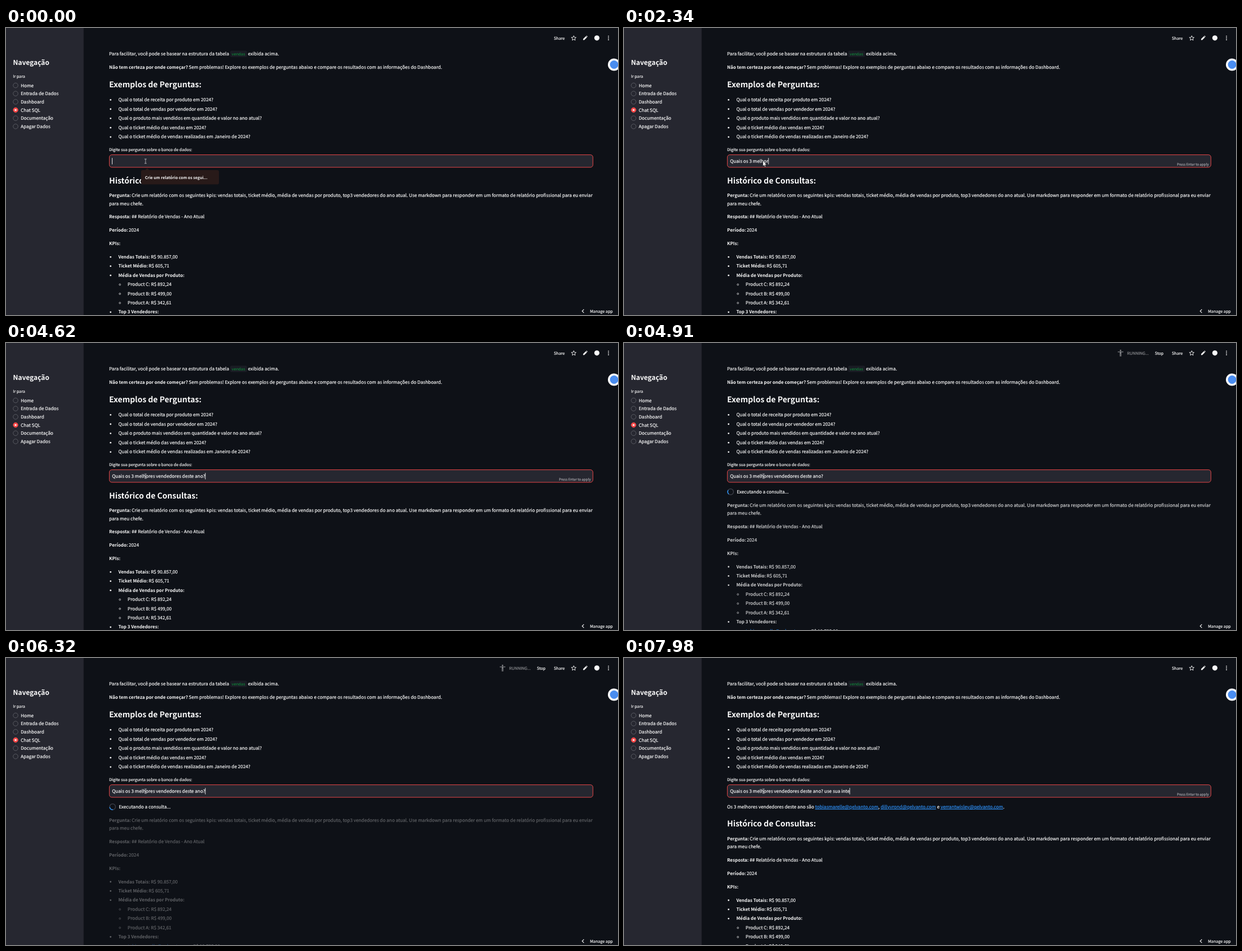
These frames come from a looping animation (1092 by 513 pixels, 8000 ms). An HTML page:

```html
<!DOCTYPE html>
<html lang="pt-BR">
<head>
<meta charset="utf-8">
<title>Chat SQL</title>
<style>
html, body { margin: 0; width: 100%; height: 100%; overflow: hidden; background: #0e1117; }
svg { display: block; width: 100%; height: 100%; }
text {
  font-family: "Noto Sans CJK JP", "Noto Sans CJK SC", "Noto Sans CJK", "Open Sans", sans-serif;
  white-space: pre;
  text-rendering: geometricPrecision;
  stroke-width: 0.18px;
}
.link { fill: #2e8ff5; stroke: #2e8ff5; text-decoration: underline; }
</style>
</head>
<body>
<svg id="stage" viewBox="0 0 1092 513"></svg>
<script>
const LOOP = 8000;
const WHITE = '#fafafa', RED = '#ff4b4b', PANEL = '#262730', BG = '#0e1117';
const BODY = 8.217, SMALL = 7.19, BOLD_SCALE = 0.977;
const RUN = 4710, ANSWER = 6430, IDLE = 6530;
const stage = document.getElementById('stage');

function el(parent, tag, attrs = {}, content) {
  const node = document.createElementNS('http://www.w3.org/2000/svg', tag);
  for (const key in attrs) node.setAttribute(key, attrs[key]);
  if (content !== undefined) node.textContent = content;
  parent.appendChild(node);
  return node;
}
const group = (parent = stage) => el(parent, 'g');
const show = (node, on) => node.setAttribute('visibility', on ? 'visible' : 'hidden');

// A hairline outline gives regular text its slightly heavy screen look.
function text(parent, x, y, str, size = BODY, attrs = {}) {
  const fill = attrs.fill || WHITE;
  return el(parent, 'text', { x, y, 'font-size': size, fill, stroke: fill, ...attrs }, str);
}
function bold(parent, x, y, str, size = BODY * BOLD_SCALE) {
  return text(parent, x, y, str, size, { 'font-weight': 700, stroke: 'none' });
}
function pair(parent, x, y, label, x2, rest) {
  bold(parent, x, y, label);
  text(parent, x2, y, rest);
}
// Text flowing on one line; parts holding an @ become links.
function linked(parent, x, y, parts) {
  const line = text(parent, x, y, '');
  for (const part of parts) {
    el(line, 'tspan', part.includes('@') ? { class: 'link' } : {}, part);
  }
}
const dot = (parent, y) => el(parent, 'circle', { cx: 186.6, cy: y, r: 1.4, fill: WHITE });
const ring = (parent, y) =>
  el(parent, 'circle', { cx: 203.2, cy: y, r: 1.4, fill: 'none', stroke: WHITE, 'stroke-width': 0.7 });
const stroke = (parent, d, color, width, attrs = {}) =>
  el(parent, 'path', { d, fill: 'none', stroke: color, 'stroke-width': width, ...attrs });

const mails = ['tobiasmarelle', 'dillyvrond', 'verrantwisley'].map(name => name + '@qelvanto.com');

el(stage, 'rect', { width: 1092, height: 513, fill: BG });

// Sidebar
el(stage, 'rect', { width: 138.5, height: 513, fill: PANEL });
bold(stage, 12.5, 65.8, 'Navegação', 12.05);
text(stage, 12.5, 88.8, 'Ir para', SMALL);
['Home', 'Entrada de Dados', 'Dashboard', 'Chat SQL', 'Documentação', 'Apagar Dados'].forEach((name, i) => {
  const y = 102.6 + i * 14.66, on = i === 3;
  el(stage, 'circle', {
    cx: 17.1, cy: y, r: 4.3, fill: on ? RED : PANEL,
    stroke: on ? RED : '#7b7c83', 'stroke-width': 0.6
  });
  if (on) el(stage, 'circle', { cx: 17.1, cy: y, r: 1.7, fill: WHITE });
  text(stage, 26.2, y + 3.1, name);
});

// Toolbar
text(stage, 977.5, 20.8, 'Share', SMALL);
let star = '';
for (let i = 0; i < 10; i++) {
  const a = i * Math.PI / 5, r = i % 2 ? 2 : 4.5;
  star += (i ? 'L' : 'M') + (1013 + r * Math.sin(a)) + ' ' + (18.3 - r * Math.cos(a));
}
stroke(stage, star + 'Z', WHITE, 0.9, { 'stroke-linejoin': 'round' });
el(stage, 'path', {
  d: 'M1029.8 21.6V19.6L1034.6 14.8L1036.6 16.8L1031.8 21.6ZM1035.2 14.2L1036 13.6L1037.8 15.4L1037.2 16.2Z',
  fill: WHITE
});
el(stage, 'circle', { cx: 1054.3, cy: 17.8, r: 4.6, fill: WHITE });
for (const y of [14.6, 17.8, 21]) el(stage, 'circle', { cx: 1075, cy: y, r: 0.95, fill: WHITE });

// Floating badge
el(stage, 'circle', { cx: 1085, cy: 65.5, r: 11, fill: '#fff' });
el(stage, 'circle', { cx: 1085, cy: 65.5, r: 7.4, fill: '#4a8df0' });

// Introduction
text(stage, 184, 49.1, 'Para facilitar, você pode se basear na estrutura da tabela');
el(stage, 'rect', { x: 400, y: 40.5, width: 30, height: 11.5, rx: 2.3, fill: '#1a1c24' });
text(stage, 402.4, 48.7, 'vendas', 6.9, {
  fill: '#0c9a3c', stroke: 'none', style: 'font-family:"Noto Sans Mono","DejaVu Sans Mono",monospace'
});
text(stage, 431.8, 49.1, 'exibida acima.');
pair(stage, 184, 72.7, 'Não tem certeza por onde começar?', 326,
  'Sem problemas! Explore os exemplos de perguntas abaixo e compare os resultados com as informações do Dashboard.');
bold(stage, 184, 105.8, 'Exemplos de Perguntas:', 14.05);
[
  'Qual o total de receita por produto em 2024?',
  'Qual o total de vendas por vendedor em 2024?',
  'Qual o produto mais vendidos em quantidade e valor no ano atual?',
  'Qual o ticket médio das vendas em 2024?',
  'Qual o ticket médio de vendas realizadas em Janeiro de 2024?'
].forEach((line, i) => {
  const y = 128 + i * 16.6;
  dot(stage, y + 0.4);
  text(stage, 200.4, y + 3, line);
});

// Question field
text(stage, 184, 220, 'Digite sua pergunta sobre o banco de dados:', SMALL);
el(stage, 'rect', {
  x: 184.4, y: 226.6, width: 862.8, height: 22.4, rx: 4.4,
  fill: PANEL, stroke: RED, 'stroke-width': 0.9
});
const typed = text(stage, 189.2, 241.3, '');
const caret = el(stage, 'rect', { y: 232.3, width: 0.9, height: 11.4, fill: WHITE });
const hint = text(stage, 986.4, 246.2, 'Press Enter to apply', 6.16, { fill: '#a8a8ad' });

// History of queries
const history = group(), heading = group(history), log = group(history);
bold(heading, 184, 277.8, 'Histórico de Consultas:', 14.05);
pair(log, 184, 302, 'Pergunta:', 224.3,
  'Crie um relatório com os seguintes kpis: vendas totais, ticket médio, média de vendas por produto, ' +
  'top3 vendedores do ano atual. Use markdown para responder em um formato de relatório profissional para eu enviar');
text(log, 184, 316.5, 'para meu chefe.');
pair(log, 184, 340.4, 'Resposta:', 224.2, '## Relatório de Vendas - Ano Atual');
pair(log, 184, 364.1, 'Período:', 219, '2024');
bold(log, 184, 387.9, 'KPIs:');
const rowY = i => 408.9 + i * 16.42;
[['Vendas Totais:', 258.4, 'R$ 90.857,00'], ['Ticket Médio:', 254.6, 'R$ 605,71'], ['Média de Vendas por Produto:']]
  .forEach(([label, x, value], i) => {
    dot(log, rowY(i) + 0.4);
    pair(log, 200.4, rowY(i) + 3, label, x || 0, value || '');
  });
['C: R$ 892,24', 'B: R$ 499,00', 'A: R$ 342,61'].forEach((value, i) => {
  ring(log, rowY(i + 3) + 0.5);
  text(log, 217, rowY(i + 3) + 3, 'Product ' + value);
});
dot(log, rowY(6) + 0.4);
bold(log, 200.4, rowY(6) + 3, 'Top 3 Vendedores:');
ring(log, rowY(7) + 0.5);
linked(log, 217, rowY(7) + 3, [mails[0], ': R$ 10.795,00']);

const answer = group();
linked(answer, 184, 268.9, ['Os 3 melhores vendedores deste ano são ', mails[0], ', ', mails[1], ' e ', mails[2], '.']);

// Busy state
const busy = group();
const GREY = '#85868a';
el(busy, 'circle', { cx: 886, cy: 13.4, r: 1.3, fill: GREY });
stroke(busy, 'M881 15.9H891', GREY, 1.2);
stroke(busy, 'M886 15.6V19.4', GREY, 2.6);
stroke(busy, 'M885.2 19V24M886.8 19V24', GREY, 1.1);
text(busy, 897.8, 20.8, 'RUNNING...', SMALL, { fill: '#8f9094' });
text(busy, 947.3, 20.8, 'Stop', SMALL);

const spinner = group();
text(spinner, 201.2, 268.9, 'Executando a consulta...');
el(spinner, 'circle', { cx: 190.2, cy: 266, r: 5.2, fill: 'none', stroke: '#3a3c46', 'stroke-width': 1.5 });
const arc = stroke(spinner, 'M186.52 262.32A5.2 5.2 0 0 1 193.88 262.32', '#2b8ae6', 1.6);

// Autofill tooltip
const tip = group();
el(tip, 'path', { d: 'M248 254.5L252 250.6L256 254.5Z', fill: '#281a19' });
el(tip, 'rect', { x: 241, y: 254, width: 139, height: 25.5, rx: 3, fill: '#281a19' });
bold(tip, 248, 270.1, 'Crie um relatório com os segui...', 7.05);

// Word suggestions above the field
const popups = [
  [830, 1130, 205, ['Quais', 'Qual', 'Quando']],
  [1130, 1430, 213, ['são', 'são os', 'as']],
  [1430, 1930, 222, ['dados', 'melhores', 'dias']],
  [2640, 3120, 267, ['vendedores', 'resultados', 'momentos do ano']],
  [7660, 7980, 388, ['inteligência', 'integração', 'interna']]
].map(([from, to, left, words]) => {
  const node = group();
  const box = el(node, 'rect', { x: left, y: 212, height: 19.6, rx: 4, fill: '#2a2a2d' });
  let x = left + 11;
  for (const word of words) {
    const t = text(node, x, 224.7, word, 7.4, {
      fill: '#ececec', stroke: 'none', style: 'font-family:"Open Sans","Noto Sans",sans-serif'
    });
    x += t.getComputedTextLength() + 15;
  }
  box.setAttribute('width', x - 8 - left);
  return { node, from, to };
});

// Footer control
stroke(stage, 'M1031.2 502.8L1028 506L1031.2 509.2', WHITE, 1.1);
text(stage, 1042, 508.7, 'Manage app', SMALL);

// Mouse pointers
const beam = group();
stroke(beam, 'M247 234.2H251M249 234.2V242M247 242H251', '#c8c8cc', 0.8);
const arrow = el(stage, 'path', {
  d: 'M248 237.6V246.8L250.1 244.9L251.5 248L252.9 247.4L251.5 244.4H254.3Z',
  fill: '#fff', stroke: '#111', 'stroke-width': 0.4
});

const phrase = 'Quais os 3 melhores vendedores deste ano? use sua inte';
// [time, characters typed]
const keys = [
  [400, 1], [610, 2], [830, 3], [1030, 5], [1130, 6], [1230, 8], [1620, 9], [1830, 11], [1930, 12],
  [2040, 15], [2240, 16], [3020, 26], [3120, 28], [3220, 29], [3320, 30], [3840, 36], [4250, 41],
  [6630, 42], [7250, 48], [7350, 49], [7440, 50], [7660, 51], [7770, 52], [7870, 53], [7980, 54]
];
function typedCount(t) {
  if (t < keys[0][0]) return 0;
  const i = keys.findLastIndex(key => key[0] <= t);
  const [t0, n0] = keys[i];
  const next = keys[i + 1];
  if (!next) return n0;
  return n0 + Math.floor((next[1] - n0) * (t - t0) / (next[0] - t0) + 1e-6);
}
function caretOn(t) {
  if (t < 400) return t < 210;
  if (t < 4250 || t >= 6630) return true;
  return Math.floor((t - 4250) / 500) % 2 === 0;
}

let lastCount = -1;
function draw(t) {
  const count = typedCount(t);
  if (count !== lastCount) {
    typed.textContent = phrase.slice(0, count);
    caret.setAttribute('x', 189.1 + (count ? typed.getComputedTextLength() : 0));
    lastCount = count;
  }
  show(caret, caretOn(t));
  show(hint, (t >= 400 && t < RUN) || t >= 6630);
  show(tip, t < 400);
  for (const p of popups) show(p.node, t >= p.from && t < p.to);

  const pointing = t >= 1130 && t < 2440;
  show(arrow, pointing);
  show(beam, !pointing);

  const running = t >= RUN && t < ANSWER;
  show(busy, t >= RUN && t < IDLE);
  show(spinner, running);
  show(heading, !running);
  show(answer, t >= ANSWER);
  history.setAttribute('transform', `translate(0 ${running ? -9.3 : t >= ANSWER ? 23.7 : 0})`);
  history.setAttribute('opacity', running ? 1 - 0.66 * Math.min(1, (t - RUN) / 800) : 1);
  arc.setAttribute('transform', `rotate(${45 + (t - 5210) / 750 * 360} 190.2 266)`);
}

const start = performance.now();
function tick() {
  draw((performance.now() - start) % LOOP);
  requestAnimationFrame(tick);
}
tick();
</script>
</body>
</html>
```
